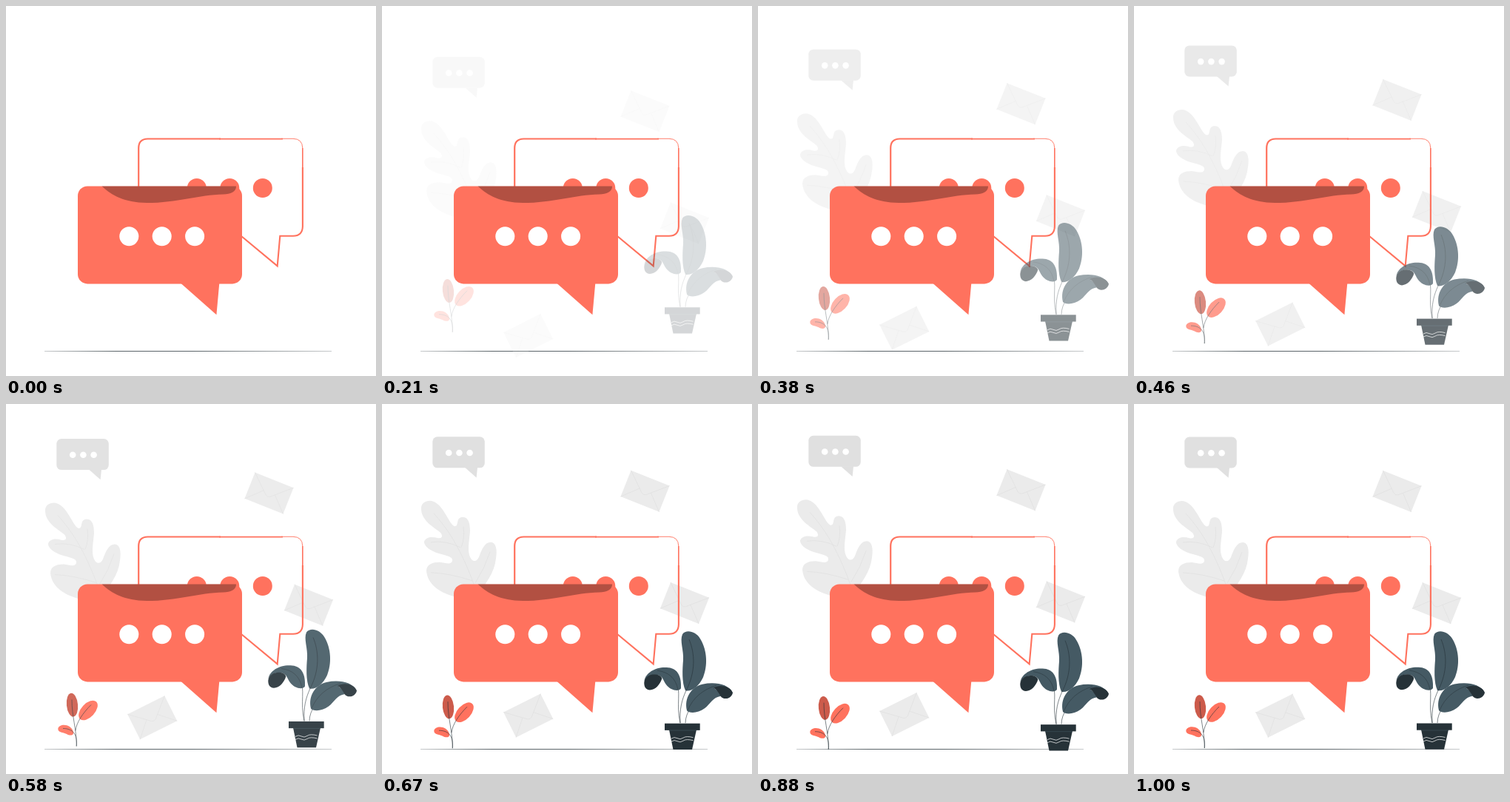
These frames come from a looping animation (500 px wide and 500 px high, 1.04 s). An HTML page with a canvas:

```html
<!DOCTYPE html>
<html lang="en">
<head>
<meta charset="utf-8">
<title>Chat bubbles</title>
<style>
html, body { margin: 0; width: 100%; height: 100%; overflow: hidden; background: #fff; }
canvas { display: block; width: 500px; height: 500px; }
</style>
</head>
<body>
<canvas id="stage" width="500" height="500"></canvas>
<script>
const SIZE = 500, LOOP = 1040, FPS = 24, RISE = 30;
const CORAL = '#ff725e', DARK = '#263238', SLATE = '#455a64', PALE = '#ebebeb', GREY = '#e0e0e0';

const ctx = document.getElementById('stage').getContext('2d');
const layer = document.createElement('canvas');
layer.width = layer.height = SIZE;
const lctx = layer.getContext('2d');

function fill(c, d, color) {
  c.fillStyle = color;
  c.fill(new Path2D(d));
}

function line(c, d, color, width) {
  c.strokeStyle = color;
  c.lineWidth = width;
  c.stroke(new Path2D(d));
}

function oval(c, x, y, rx, ry, angle, color) {
  c.fillStyle = color;
  c.beginPath();
  c.ellipse(x, y, rx, ry, angle, 0, Math.PI * 2);
  c.fill();
}

function dots(c, x, y, gap, r, color) {
  for (let i = 0; i < 3; i++) oval(c, x + i * gap, y, r, r, 0, color);
}

function box(c, x, y, w, h, r, color) {
  c.fillStyle = color;
  c.beginPath();
  c.roundRect(x, y, w, h, r);
  c.fill();
}

function envelope(c, x, y, degrees) {
  c.save();
  c.translate(x, y);
  c.rotate(degrees * Math.PI / 180);
  c.fillStyle = PALE;
  c.fillRect(-28, -19, 56, 38);
  line(c, 'M-28 -19L-3 4Q0 6 3 4L28 -19M-28 19L-8 -1M28 19L8 -1', GREY, 0.7);
  c.restore();
}

function bigLeaf(c) {
  fill(c, 'M53 143C52 135 58 131 65 131C77 132 84 146 90 156C94 163 98 168 101 164' +
    'C103 160 101 154 109 153C117 153 119 162 119 172C118 185 115 198 119 207' +
    'C122 214 128 214 131 207C135 196 139 187 147 187C154 187 156 197 154 209' +
    'C152 228 141 243 124 264L104 262C85 258 62 248 60 226C60 217 68 214 78 214' +
    'C86 215 94 218 95 212C96 206 86 205 76 202C66 199 56 192 57 186' +
    'C59 180 67 179 74 181C81 183 83 179 79 174C71 167 54 159 53 143Z', PALE);
  line(c, 'M70 148C88 168 106 194 125 246M66 187Q86 184 106 194M110 166Q112 182 107 194' +
    'M66 228Q92 229 122 239M146 200Q139 222 126 242', GREY, 0.7);
}

function drawRising(c) {
  box(c, 68.3, 44.5, 70.5, 42, 6.5, GREY);
  fill(c, 'M112 86L127.6 99.7L129 86Z', GREY);
  dots(c, 90.2, 66.2, 14.2, 4.3, '#fff');
  bigLeaf(c);
  envelope(c, 355.5, 118, 21.7);
  envelope(c, 409, 269.2, 21.7);
  envelope(c, 197.7, 421.2, -26.5);
}

function sprout(c) {
  oval(c, 89.5, 409.2, 7.6, 16, -0.1, '#cc5b4b');
  oval(c, 111, 416.5, 16, 9.2, -0.82, CORAL);
  fill(c, 'M70.3 441C72 434 88 434 91.2 446C91.5 451 86 451 82 448.5C77 446 70 447 70.3 441Z', CORAL);
  line(c, 'M95.5 465C95 440 89 425 89 402M94 444C95 433 104 420 115 409' +
    'M95 465C97 450 91 441 77 441', DARK, 0.6);
}

function potPlant(c) {
  line(c, 'M403 431C397 405 405 388 397 374M403 431C402 412 405 400 411 387M410 431Q410 420 418 409', DARK, 0.6);

  fill(c, 'M410 387C405 376 406 358 407 346C408 332 402 320 406 311' +
    'C411 304 424 307 430 317C440 333 440 354 434 369C428 382 418 389 410 387Z', SLATE);
  line(c, 'M411 387C424 362 423 337 415 318', DARK, 0.6);

  fill(c, 'M354.5 374C356 362 372 354 387 356C400 357 405 369 404 384C401 389 390 387 384 379' +
    'C379 372 380 368 373 366C364 364 357 368 354.5 374Z', SLATE);
  fill(c, 'M354.3 376C355 368 363 364.5 370 365.3C375 366 378 368 378.2 371' +
    'C376 378 370 386 362 386.3C356 386 354 381 354.3 376Z', DARK);
  line(c, 'M400 386C397 370 387 362 372 360', DARK, 0.5);

  fill(c, 'M412 414C408 397 418 382 433 378.5C450 375 468 378 474 390C465 384 457 381 449 384' +
    'C454 387 457 391 458 394.5C447 396 444 405 436 411C427 418 415 418 412 414Z', SLATE);
  fill(c, 'M474 390C472 399 461 400 457.5 394.5C455 390 452 385 448 383.5C456 378 471 381 474 390Z', DARK);
  line(c, 'M413 414C420 397 433 386 452 380', DARK, 0.5);

  c.fillStyle = DARK;
  c.fillRect(382, 431.5, 47.7, 9.2);
  fill(c, 'M388 440H425L419 466.7H393.5Z', DARK);
  line(c, 'M388 441H425', '#455a64', 0.5);
  for (const y of [451, 455]) {
    line(c, `M391 ${y + 1}Q395 ${y - 2} 399 ${y + 0.5}T407 ${y}T420.5 ${y - 0.5}`, '#fff', 0.7);
  }
}

function drawSinking(c) {
  sprout(c);
  potPlant(c);
}

function drawFloor(c) {
  fill(c, 'M52 466.2L150 466L250 465.9L440 466.2V466.6L250 466.7L150 466.7L52 466.5Z', DARK);
}

function drawBubbles(c) {
  c.lineJoin = 'miter';
  line(c, 'M179.2 250V192Q179.2 179.6 191.5 179.5H290', CORAL, 2.2);
  line(c, 'M288 179.6H374', CORAL, 1.6);
  line(c, 'M372 179.3H388Q400.5 179.5 400.8 192V218', CORAL, 0.9);
  line(c, 'M400.8 192V220', CORAL, 1.4);
  line(c, 'M400.9 218V298Q400.5 310.7 388 310.8H370.3L366.7 351.3L312 306', CORAL, 2.1);
  dots(c, 257.8, 246, 44.5, 13, CORAL);

  box(c, 97, 243.4, 222, 132, 13, CORAL);
  fill(c, 'M236 374.5L284.4 417.2L288.3 374.5Z', CORAL);
  fill(c, 'M129.5 243.5H311C311.5 251 303 254.3 294 254.4C260 255 232 266 190 266' +
    'C160 265.500 143 256 129.500 243.500Z', 'rgba(0,0,0,.3)');
  dots(c, 166.3, 311.2, 44.4, 13, '#fff');
}

// cubic-bezier(.36, -.01, .5, 1.38)
function ease(x) {
  if (x >= 1) return 1;
  const bez = (a, b, u) => 3 * a * u * (1 - u) ** 2 + 3 * b * u * u * (1 - u) + u ** 3;
  let lo = 0, hi = 1;
  for (let i = 0; i < 30; i++) {
    const mid = (lo + hi) / 2;
    if (bez(0.36, 0.5, mid) < x) lo = mid; else hi = mid;
  }
  return bez(-0.01, 1.38, lo);
}

function fadeGroup(draw, dy, alpha) {
  lctx.clearRect(0, 0, SIZE, SIZE);
  lctx.save();
  lctx.translate(0, dy);
  draw(lctx);
  lctx.restore();
  ctx.globalAlpha = alpha;
  ctx.drawImage(layer, 0, 0);
  ctx.globalAlpha = 1;
}

function render(ms) {
  // motion is stepped at 24 per second, sampled mid-step
  const step = Math.floor((Math.floor(ms / 10) * 10 + 5) * FPS / 1000);
  const p = ease((step + 0.5) / FPS);
  const alpha = step < 2 ? 0 : Math.min(1, Math.max(0, p));
  const shift = RISE * (1 - p);

  ctx.fillStyle = '#fff';
  ctx.fillRect(0, 0, SIZE, SIZE);
  drawFloor(ctx);
  fadeGroup(drawRising, shift, alpha);
  drawBubbles(ctx);
  fadeGroup(drawSinking, -shift, alpha);
}

const start = performance.now();
function tick() {
  render((performance.now() - start) % LOOP);
  requestAnimationFrame(tick);
}
tick();
</script>
</body>
</html>
```
